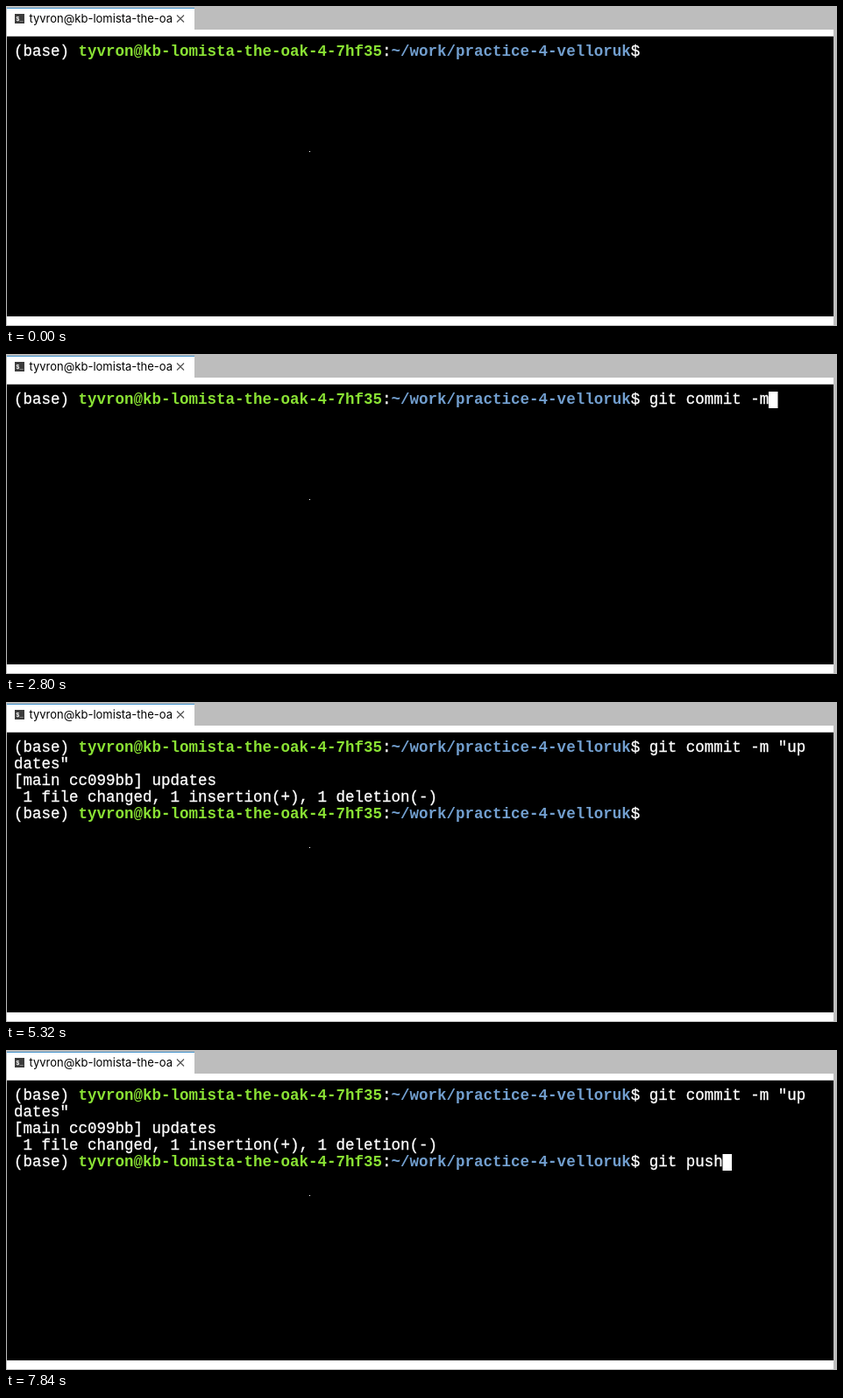
An HTML page for the animation above (8000 ms loop, 948 px wide and 366 px high).

```html
<!DOCTYPE html>
<html lang="en">
<head>
<meta charset="utf-8">
<title>Terminal</title>
<style>
  html, body { margin: 0; width: 100%; height: 100%; overflow: hidden; background: #fff; }
  svg { display: block; width: 948px; height: 366px; }
  text { white-space: pre; }
  .line { font: 17.5px "Liberation Mono", "Courier New", monospace; fill: #fff; stroke: #fff; stroke-width: .3px; }
  .user, .path { font-weight: bold; stroke: none; }
  .user { fill: var(--user); }
  .path { fill: var(--path); }
  .chrome { fill: var(--chrome); }
  .title { font: 13px Inter, sans-serif; fill: #000; }
  .icon { font: bold 7px "Liberation Mono", monospace; fill: #fff; }
</style>
</head>
<body>
<svg id="stage" viewBox="0 0 948 366">
  <clipPath id="titleClip"><rect x="24" y="4" width="167" height="22"/></clipPath>
  <rect class="chrome" width="948" height="366"/>
  <rect x="1" y="27" width="943" height="338" fill="#fff"/>
  <rect x="1" y="2" width="214" height="26" fill="#fff"/>
  <rect x="1" y="2" width="214" height="1" fill="#3d8fc9"/>
  <rect class="chrome" x="1" y="34" width="943" height="1"/>
  <rect x="1" y="35" width="943" height="320"/>
  <rect x="10" y="9" width="11" height="11" fill="#3c3c3c"/>
  <text class="icon" x="11.2" y="16.5">$_</text>
  <text class="title" x="26.5" y="19" clip-path="url(#titleClip)">tyvron@kb-lomista-the-oak-4-7hf35</text>
  <path d="M195 10.5l8 8m0-8l-8 8" stroke="#555" stroke-width="1.2"/>
  <g id="lines"></g>
  <rect id="cursor" width="10.5" height="19" fill="#fff"/>
  <rect x="346" y="166" width="1" height="1" fill="#fff"/>
</svg>
<script>
const LOOP = 8000, CELL = 10.5, ROW = 19, LEFT = 9, TOP = 43, COLS = 86, PROMPT = 69;
const COMMIT = 'git commit -m "updates"', PUSH = 'git push';
const promptMarkup = '(base) <tspan class="user">tyvron@kb-lomista-the-oak-4-7hf35</tspan>:' +
  '<tspan class="path">~/work/practice-4-velloruk</tspan>$ ';

// [time, characters typed so far]
const commitKeys = [[280, 1], [980, 3], [1260, 4], [1820, 6], [2100, 7], [2240, 8], [2380, 9],
  [2520, 10], [2660, 12], [2800, 13], [2940, 15], [3360, 18], [3780, 19], [4060, 21], [4200, 23]];
const pushKeys = [[6720, 1], [6860, 2], [7000, 4], [7560, 6], [7840, 8]];

const stage = document.getElementById('stage');
const lines = document.getElementById('lines');
const cursor = document.getElementById('cursor');
const between = (t, a, b) => t >= a && t < b;
const typed = (keys, t) => keys.reduce((n, [at, count]) => t >= at ? count : n, 0);

const rows = Array.from({ length: 5 }, (_, i) => {
  const el = document.createElementNS('http://www.w3.org/2000/svg', 'text');
  el.setAttribute('class', 'line');
  el.setAttribute('x', LEFT);
  el.setAttribute('y', TOP + 14 + i * ROW);
  return lines.appendChild(el);
});

function setCursor(row, col, visible) {
  cursor.setAttribute('x', LEFT + col * CELL);
  cursor.setAttribute('y', TOP + row * ROW);
  cursor.style.display = visible ? '' : 'none';
}

let shown = '';
function render(t) {
  const vivid = between(t, 4060, 5040);
  stage.style.setProperty('--user', vivid ? '#55e60c' : '#8ae234');
  stage.style.setProperty('--path', vivid ? '#5289c9' : '#729fcf');
  stage.style.setProperty('--chrome', vivid ? '#aeaeae' : '#bdbdbd');

  const count = typed(commitKeys, t);
  const command = COMMIT.slice(0, count);
  const push = PUSH.slice(0, typed(pushKeys, t));
  const done = t >= 5320;
  const room = COLS - PROMPT;
  const content = [
    promptMarkup + command.slice(0, room),
    command.slice(room),
    done ? '[main cc099bb] updates' : '',
    done ? ' 1 file changed, 1 insertion(+), 1 deletion(-)' : '',
    done ? promptMarkup + push : ''
  ];
  const key = content.join('\n');
  if (key !== shown) {
    rows.forEach((el, i) => { el.innerHTML = content[i]; });
    shown = key;
  }

  if (done) {
    setCursor(4, PROMPT + push.length, between(t, 5460, 6160) || t >= 6720);
  } else {
    const at = PROMPT + count;
    setCursor(Math.floor(at / COLS), at % COLS, between(t, 140, 4760));
  }
}

function tick(now) {
  render(now % LOOP);
  requestAnimationFrame(tick);
}
render(0);
requestAnimationFrame(tick);
</script>
</body>
</html>
```
